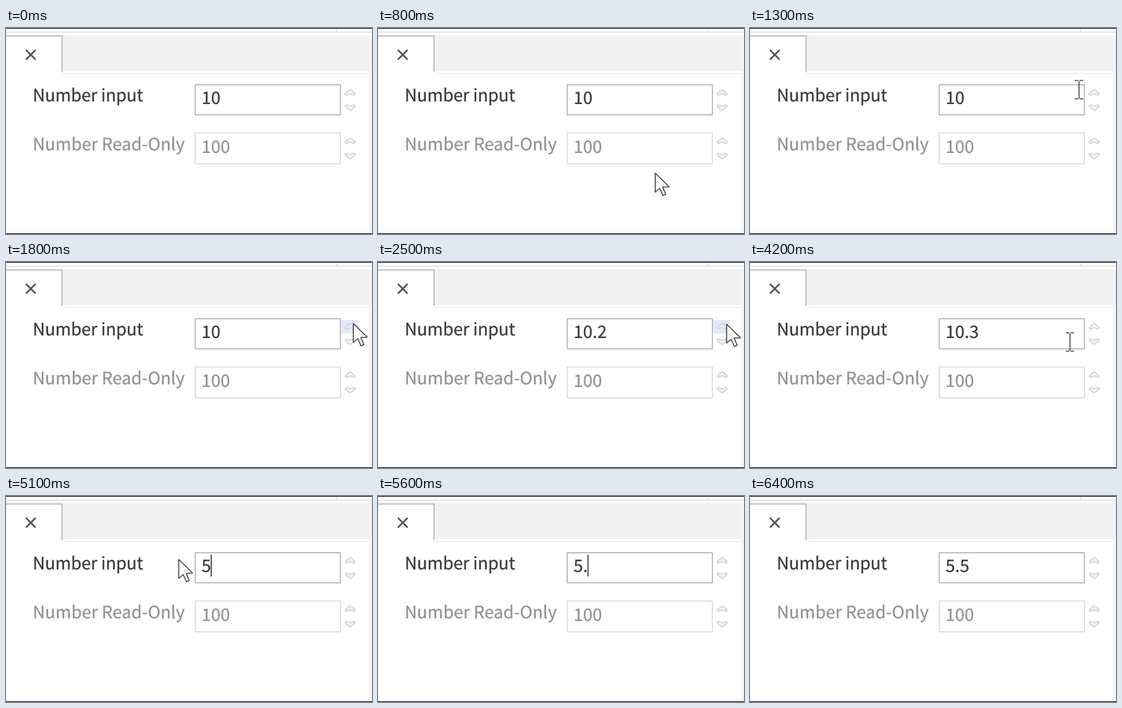
Animation, 569 px wide and 320 px high, one loop 8.2 s. Source, as an HTML page:

```html
<!DOCTYPE html>
<html lang="en">
<head>
<meta charset="utf-8">
<title>Number input</title>
<style>
  html, body { margin: 0; width: 100%; height: 100%; overflow: hidden; background: #fff; }
  svg { display: block; width: 569px; height: 320px; }
  text {
    font: 26.6px "Noto Sans CJK SC", "Noto Sans CJK JP", "Noto Sans CJK", "Noto Sans", sans-serif;
    fill: #3a3a3a; stroke: #3a3a3a; stroke-width: .45; stroke-opacity: .6;
    text-rendering: geometricPrecision; white-space: pre;
  }
  .dim { fill: #929292; stroke: #929292; }
  .line { fill: none; stroke: #b4b4b4; stroke-width: 1.7; }
  .faint { stroke: #dcdcdc; }
  .spin { fill: #f4f4f4; fill-opacity: .7; stroke: #d6d6d6; stroke-width: 1.9; stroke-linejoin: round; }
</style>
</head>
<body>
<svg viewBox="0 0 569 320">
  <defs>
    <path id="chevron" d="M-8 2.3 L0 -4.5 L8 2.3 L5.8 4.3 L0 1.8 L-5.8 4.3 Z"/>
  </defs>
  <rect width="569" height="320" fill="#fff"/>
  <path class="line faint" d="M0 6.5 H569 M513.5 1 V6"/>
  <rect x="88" y="11" width="478" height="56" fill="#f1f1f1"/>
  <rect x="565" y="11" width="4" height="308" fill="#f3f3f3"/>
  <path class="line faint" stroke-opacity=".6" d="M88 70.5 H565"/>
  <path class="line" d="M0 12.3 H87.2 V68"/>
  <path d="M31 34 L46 49 M46 34 L31 49" stroke="#555" stroke-width="2.6"/>

  <text x="41.4" y="114" letter-spacing="-.15">Number input</text>
  <text x="41.4" y="190.2" class="dim">Number Read-Only</text>
  <rect class="line" x="294.2" y="88.2" width="225.6" height="46.6"/>
  <rect class="line faint" x="294.2" y="163.2" width="225.6" height="47.8"/>
  <text x="304" y="194" class="dim">100</text>

  <rect id="hover" x="521" width="26" height="21" fill="#e0eafb"/>
  <g class="spin">
    <use href="#chevron" x="535" y="100"/>
    <use href="#chevron" transform="translate(535 123.7) scale(1 -1)"/>
    <use href="#chevron" x="535" y="175"/>
    <use href="#chevron" transform="translate(535 199) scale(1 -1)"/>
  </g>

  <rect id="mark" y="90" height="36" fill="#0078d7"/>
  <text x="304" y="117.7"><tspan id="plain"></tspan><tspan id="picked" fill="#fff" stroke="#fff"></tspan></text>
  <path id="caret" d="M0 91 V125" stroke="#333" stroke-width="1.6"/>

  <path id="arrow" d="M0 .5 V30 L7 24 L12 35.3 L16.4 33.3 L11.6 22.3 L21.6 21.8 Z"
        fill="#fff" stroke="#444" stroke-width="1.6" stroke-linejoin="round"/>
  <path id="beam" d="M-6.5 -14 H-1 M1 -14 H6.5 M0 -13 V14 M-6.5 14.5 H-1 M1 14.5 H6.5"
        fill="none" stroke="#444" stroke-width="1.6"/>
  <path d="M0 .5 H569 M0 319.5 H569" stroke="#000"/>
</svg>
<script>
  const LOOP = 8200;
  const TEXT_X = 304, DIGIT = 14.75, DOT = 7.4;

  // time, shape, x, y
  const pointer = [
    [0, ''],
    [700, 'arrow', 415, 251], [800, 'arrow', 431, 225], [900, 'beam', 452, 188],
    [1000, 'arrow', 473, 150], [1100, 'beam', 491, 121], [1200, 'beam', 504, 103],
    [1300, 'beam', 511.5, 95.5], [1400, 'beam', 516, 95], [1500, 'beam', 519.5, 95],
    [1600, 'arrow', 529, 95], [1700, 'arrow', 536, 95], [1800, 'arrow', 540, 95],
    [1900, 'arrow', 542, 95], [2100, 'arrow', 542, 96],
    [3300, 'arrow', 542, 105], [3400, 'arrow', 542, 118], [3500, 'arrow', 542, 127],
    [4100, 'beam', 516, 125], [4200, 'beam', 497.5, 124], [4300, 'beam', 425, 119],
    [4400, 'beam', 333, 112], [4500, 'arrow', 268.5, 106], [5100, 'arrow', 268.5, 98],
    [5300, 'arrow', 258, 77], [5400, 'arrow', 245, 52], [5500, 'arrow', 234, 30],
    [5600, ''], [6300, 'arrow', 43, -13], [6400, '']
  ];

  // time, text, start of selection, caret shown
  const field = [
    [0, '10'], [2300, '10.1'], [2500, '10.2'], [2700, '10.3'], [2900, '10.4'],
    [3100, '10.5'], [3800, '10.4'], [4000, '10.3'],
    [4400, '10.3', 2], [4500, '10.3', 0],
    [5000, '5', 1, true], [5300, '5.', 2, true], [5800, '5.5', 3, true], [6100, '5.5']
  ];

  const $ = id => document.getElementById(id);
  const show = (el, on) => el.setAttribute('visibility', on ? 'visible' : 'hidden');
  const at = (steps, t) => steps.filter(s => s[0] <= t).pop();
  const width = s => [...s].reduce((w, c) => w + (c === '.' ? DOT : DIGIT), 0);

  function drawField(t) {
    const [, value, start = value.length, caret = false] = at(field, t);
    const plain = value.slice(0, start), picked = value.slice(start);
    $('plain').textContent = plain;
    $('picked').textContent = picked;
    $('mark').setAttribute('x', TEXT_X + width(plain));
    $('mark').setAttribute('width', width(picked));
    $('caret').setAttribute('transform', `translate(${TEXT_X + width(value) + .3} 0)`);
    show($('caret'), caret);
  }

  function drawPointer(t) {
    const [, shape, x = 0, y = 0] = at(pointer, t);
    for (const id of ['arrow', 'beam']) {
      $(id).setAttribute('transform', `translate(${x} ${y})`);
      show($(id), shape === id);
    }
    $('hover').setAttribute('y', y < 112 ? 90 : 112);
    show($('hover'), shape === 'arrow' && x > 520);
  }

  const origin = performance.now();
  function draw() {
    const t = (performance.now() - origin) % LOOP;
    drawField(t);
    drawPointer(t);
    requestAnimationFrame(draw);
  }
  draw();
</script>
</body>
</html>
```
